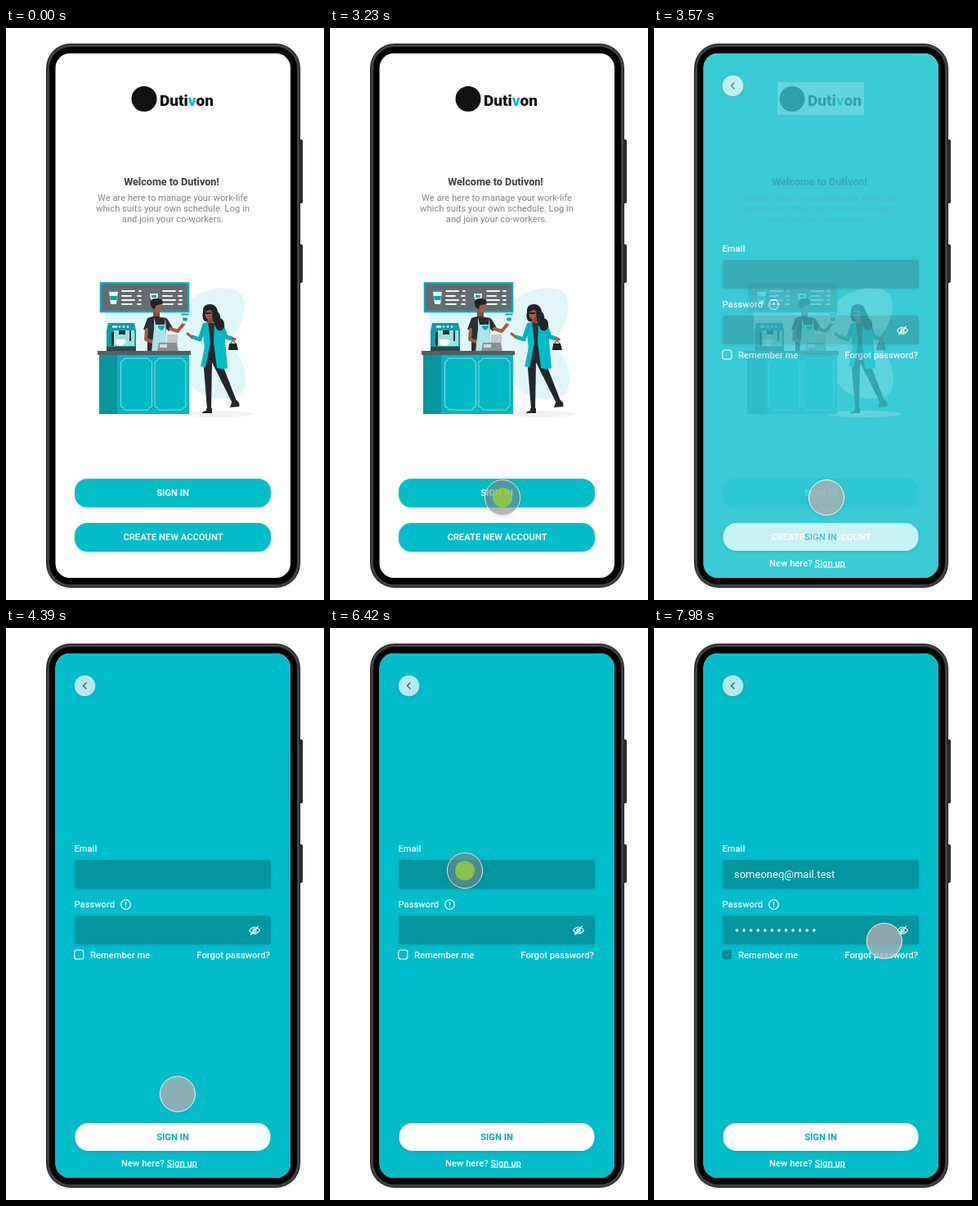
These frames come from a looping animation (389 by 698 pixels, 8 s). An HTML page:

```html
<!DOCTYPE html>
<html lang="en">
<head>
<meta charset="utf-8">
<title>Sign-in walkthrough</title>
<style>
  html, body { margin: 0; height: 100%; overflow: hidden; background: #fff; }
  svg { display: block; font: 500 11.2px Roboto, sans-serif; }
  .mid { text-anchor: middle; }
  .cta { font-weight: 700; text-anchor: middle; }
  .line { fill: none; stroke-linecap: round; stroke-linejoin: round; }
  .soft { filter: drop-shadow(0 1px 2px rgba(0, 60, 70, .14)); }
</style>
</head>
<body>
<svg width="389" height="698" viewBox="0 0 389 698">
  <defs>
    <clipPath id="glass"><rect x="60.500" y="31" width="287.500" height="640" rx="17.500"/></clipPath>
    <path id="panel" d="M145 403H174Q175 407 178.500 407V462Q175 462 174 466H145Q144 462 140.500 462V407Q144 407 145 403Z" fill="#00b9c5" stroke="#a9e9ec" stroke-width=".8"/>
  </defs>

  <!-- phone -->
  <g>
    <path d="M359 136h2.500q1.500 0 1.500 2v74q0 2-1.500 2H359zM359 264h2.500q1.500 0 1.500 2v43q0 2-1.500 2H359z" fill="#2b2b2b"/>
    <rect x="49" y="19" width="311" height="664" rx="30" fill="#1d1d1d"/>
    <rect x="51.500" y="21.500" width="306" height="659" rx="27.500" fill="#000" stroke="#414141" stroke-width="3"/>
    <rect x="55" y="25" width="299" height="652" rx="23"/>
  </g>

  <g clip-path="url(#glass)">
    <rect x="60" y="31" width="288" height="640" fill="#fff"/>

    <!-- sign-in page -->
    <g id="signin" opacity="0">
      <rect x="60" y="31" width="288" height="640" fill="#00bdca"/>
      <circle class="soft" cx="96.500" cy="70.500" r="12.800" fill="#b5e8ec"/>
      <path class="line" d="M98 67l-3.500 3.500L98 74" stroke="#29565c" stroke-width="1.300"/>
      <g fill="#00959f">
        <rect class="soft" x="84" y="283" width="240" height="35" rx="3"/>
        <rect class="soft" x="84" y="351" width="240" height="35" rx="3"/>
      </g>
      <g fill="#fff">
        <text x="83.500" y="272.500">Email</text>
        <text x="83.500" y="340.500">Password</text>
        <text x="103" y="402.500">Remember me</text>
        <text x="323" y="402.500" text-anchor="end">Forgot password?</text>
        <text class="mid" x="187.500" y="656.500">New here? <tspan text-decoration="underline">Sign up</tspan></text>
        <rect class="soft" x="84.500" y="604" width="239" height="34" rx="16"/>
      </g>
      <text class="cta" x="204" y="625" fill="#00aab8">SIGN IN</text>
      <g class="line" stroke="#fff" stroke-width="1.200">
        <circle cx="146.500" cy="337.500" r="5.800"/>
        <path d="M146.500 334.500v3.500M146.500 340.500v.1"/>
        <path d="M297.500 369q6.500-8 13 0-6.500 8-13 0zM299.500 374l9-10"/>
        <circle cx="304" cy="369" r="2"/>
        <rect x="83.800" y="393" width="11" height="11" rx="2.500"/>
      </g>
      <g id="filled" opacity="0">
        <text x="98" y="305" font-size="13" font-weight="400" fill="#fff">someoneq@mail.test</text>
        <path class="line" d="M101.500 368.800H196.500" stroke="#fff" stroke-width="3.700" stroke-dasharray="0 8.570"/>
        <rect x="83.800" y="393" width="11" height="11" rx="2.500" fill="#008a94" stroke="#008a94" stroke-width="1.400"/>
        <path class="line" d="M87 398.500l1.700 1.700 3-3.200" stroke="#2fb0b8"/>
      </g>
    </g>

    <!-- welcome page, fades out above the next one -->
    <g id="welcome">
      <rect x="151" y="66" width="106" height="40" fill="#fff"/>
      <circle cx="169" cy="86.500" r="15.500" fill="#111"/>
      <text x="188" y="95" font-size="19" font-weight="900" fill="#111">Duti<tspan fill="#00bdca">v</tspan>on</text>

      <text class="mid" x="202.500" y="192" font-size="12.600" font-weight="700" fill="#3a3a3a">Welcome to Dutivon!</text>
      <g class="mid" fill="#858585" font-weight="400">
        <text x="204" y="211">We are here to manage your work-life</text>
        <text x="204" y="224">which suits your own schedule. Log in</text>
        <text x="204" y="237">and join your co-workers.</text>
      </g>

      <path d="M122 346H215C228 322 262 312 282 320C298 329 293 358 277 376C268 388 291 398 293 424C294 447 284 454 260 452C238 449 222 444 215 400H122Z" fill="#e0f6f8"/>
      <ellipse cx="258" cy="471" rx="44" ry="4" fill="#f1f1f1"/>
      <!-- menu board -->
      <rect x="116" y="311.500" width="107" height="34.500" fill="#666b70" stroke="#00a9b4" stroke-width="2.600"/>
      <path d="M126 322h11l-2 15h-7z" fill="#e9fafa"/>
      <path d="M126 320h11v2h-11zM127 327h9l-.7 5h-7.600z" fill="#0aa3ad"/>
      <path d="M176 324h10q0 9-5 9t-5-9z" fill="#e9fafa"/>
      <path d="M178 326h6v3h-6z" fill="#0aa3ad"/>
      <path class="line" d="M142 321h15M142 327h11M142 332h15M142 337h12M163 321h2M161 327h4M163 332h2M161 337h4M192 321h15M192 327h11M192 332h15M192 337h12M212 321h3M211 327h4M212 332h3M211 337h4" stroke="#f2f5f5" stroke-width="1.800"/>
      <!-- barista -->
      <path d="M180 344h8v10h-8z" fill="#8d4a37"/>
      <path d="M173 354q10-4 16-1 8 0 9 3l6 10-5 4-3-3v28h-23v-26l-5-1z" fill="#2a2e33"/>
      <path class="line" d="M172 368l-1 12 11 4M201 367l9 3 9-11" stroke="#a55a43" stroke-width="4"/>
      <path d="M181 353l2 9h11l1-8 2 41h-19l3-28z" fill="#a9e4e8"/>
      <path d="M190 369c-7-4-3-8 0-5 3-3 7 1 0 5z" fill="#00aab5"/>
      <ellipse cx="185" cy="341.500" rx="5" ry="6" fill="#a55a43"/>
      <path d="M177 338q-2-8 7-8 8 0 8 6-6 2-9 3l-1 4q-4-1-5-5z" fill="#202327"/>
      <path d="M215 350h8l-1.500 11h-5z" fill="#f4fbfb"/>
      <path d="M214.500 348.500h9v2h-9zM216 353.500h6l-.5 4h-5z" fill="#0aa3ad"/>
      <!-- coffee machine -->
      <path d="M125 360h32l2 9v24h-36v-24z" fill="#0b9fa9"/>
      <path d="M132 369h25v19h-25z" fill="#9be1e4"/>
      <path d="M123 389h36v5h-36z" fill="#34434a"/>
      <path d="M129 371h3v17h-3zM138 369h8v5h-8zM151 369h2v13h-2z" fill="#26333a"/>
      <path d="M134 380h11v3q0 5-5 5t-6-5z" fill="#fff"/>
      <path class="line" d="M145 381q4 0 0 4" stroke="#fff"/>
      <path class="line" d="M131 364.500h4M139 364.500h.1M144 364.500h.1M149 364.500h.1" stroke="#d8f5f6" stroke-width="2.500"/>
      <!-- till -->
      <path d="M197 374h13v10h-13z" fill="#c4c9cb"/>
      <path d="M187 384h22l2 11h-26z" fill="#8c9295"/>
      <path d="M188 386h9v4h-9z" fill="#d7dbdc"/>
      <!-- counter -->
      <path d="M114 399h110v72H114z" fill="#00b6c2"/>
      <path d="M114 399h22v72h-22z" fill="#07959e"/>
      <path d="M112 394h114v5H112z" fill="#575c61"/>
      <use href="#panel"/><use href="#panel" x="41.500"/>
      <!-- customer -->
      <path d="M243 384h19l4 30 16 41-5 3-20-40-5-10-1 57h-5l-4-50z" fill="#23272b"/>
      <path d="M245 464h7v6h-12q0-2 5-3zM276 457l6-3q5 4 3 8l-11 1z" fill="#23272b"/>
      <path d="M243 360h18l1 28h-19z" fill="#2a2e33"/>
      <path d="M245 358l-4 16 2 16-5 23 6 1 6-30-3-26zM255 358l9 1q5 10 4 23l3 33q-6 2-13 0l-4-32z" fill="#00bcc7"/>
      <path class="line" d="M243 362l-6 18-9-3M264 363l5 14 7 2" stroke="#00b1bc" stroke-width="5"/>
      <path class="line" d="M227 377l-5-4M277 379l3 1" stroke="#a55a43" stroke-width="3"/>
      <path d="M273 385h9l2 8h-12z" fill="#202327"/>
      <path class="line" d="M275 385q2-7 6 0" stroke="#202327"/>
      <path d="M241 347q-1-10 9-10 8 1 9 9 4 4 3 8 6 2 5 11-4 7-9 3l-5-10h-10q-4-4-2-11z" fill="#202327"/>
      <path d="M247 353h6v7h-6z" fill="#8d4a37"/>
      <ellipse cx="248" cy="349.500" rx="4.500" ry="6" fill="#a55a43"/>
      <path d="M242 346q2-7 9-6l3 7q-3-3-4-4-3 3-8 3z" fill="#202327"/>
      <path class="line" d="M244.500 348h6" stroke="#202327" stroke-width="2"/>

      <g class="soft" fill="#00bdca">
        <rect x="84" y="550" width="240" height="35" rx="15.500"/>
        <rect x="84" y="604" width="240" height="35" rx="15.500"/>
      </g>
      <g class="cta" fill="#fff">
        <text x="204" y="571">SIGN IN</text>
        <text x="204.500" y="625">CREATE NEW ACCOUNT</text>
      </g>
    </g>
  </g>

  <g id="cursor">
    <circle id="disc" class="soft" r="21.600"/>
    <circle id="press" r="12" fill="#94cb3c" fill-opacity=".84"/>
  </g>
</svg>
<script>
const LOOP = 8000;
const $ = id => document.getElementById(id);

// time, x, y
const path = [
  [1060, 304, 726], [1130, 300, 712], [1400, 271, 660], [1680, 237, 615],
  [1890, 228, 605], [2300, 211, 573], [4320, 211, 573], [4390, 210, 569],
  [4770, 184, 450], [5150, 163, 358], [5690, 165, 296], [7210, 165, 296],
  [7600, 222, 339], [8000, 282, 382]
];
const presses = [[3230, 3360], [6420, 6560]];

const same = (a, b) => a[1] === b[1] && a[2] === b[2];

// Hermite tangent, zero at rests and ends
function slope(i, axis) {
  const a = path[i - 1], p = path[i], b = path[i + 1];
  if (!a || !b || same(a, p) || same(p, b)) return 0;
  return (b[axis] - a[axis]) / (b[0] - a[0]);
}

function position(t, axis) {
  const i = Math.max(0, path.findIndex(p => p[0] > t) - 1);
  const a = path[i], b = path[i + 1], span = b[0] - a[0];
  const u = Math.max(0, (t - a[0]) / span), u2 = u * u, u3 = u2 * u;
  return a[axis] * (2 * u3 - 3 * u2 + 1) + b[axis] * (3 * u2 - 2 * u3)
    + span * (slope(i, axis) * (u3 - 2 * u2 + u) + slope(i + 1, axis) * (u3 - u2));
}

function dissolve(t, start, length) {
  const u = Math.min(1, Math.max(0, (t - start) / length));
  return 1 - (1 - u) ** 1.65;
}

function draw(now) {
  const t = now % LOOP;
  const page = dissolve(t, 3360, 350);
  $('signin').setAttribute('opacity', page);
  $('welcome').setAttribute('opacity', 1 - page);
  $('filled').setAttribute('opacity', dissolve(t, 6560, 330));

  const down = presses.some(([from, to]) => t >= from && t < to);
  $('cursor').setAttribute('visibility', t < 1130 ? 'hidden' : 'inherit');
  $('cursor').setAttribute('transform', `translate(${position(t, 1)} ${position(t, 2)})`);
  $('disc').setAttribute('fill', down ? 'rgba(136,138,140,.54)' : 'rgba(192,178,180,.72)');
  $('disc').setAttribute('stroke', down ? '#f3e3bd' : '#f4f4f4');
  $('press').setAttribute('opacity', down ? 1 : 0);
  requestAnimationFrame(draw);
}
requestAnimationFrame(draw);
</script>
</body>
</html>
```
